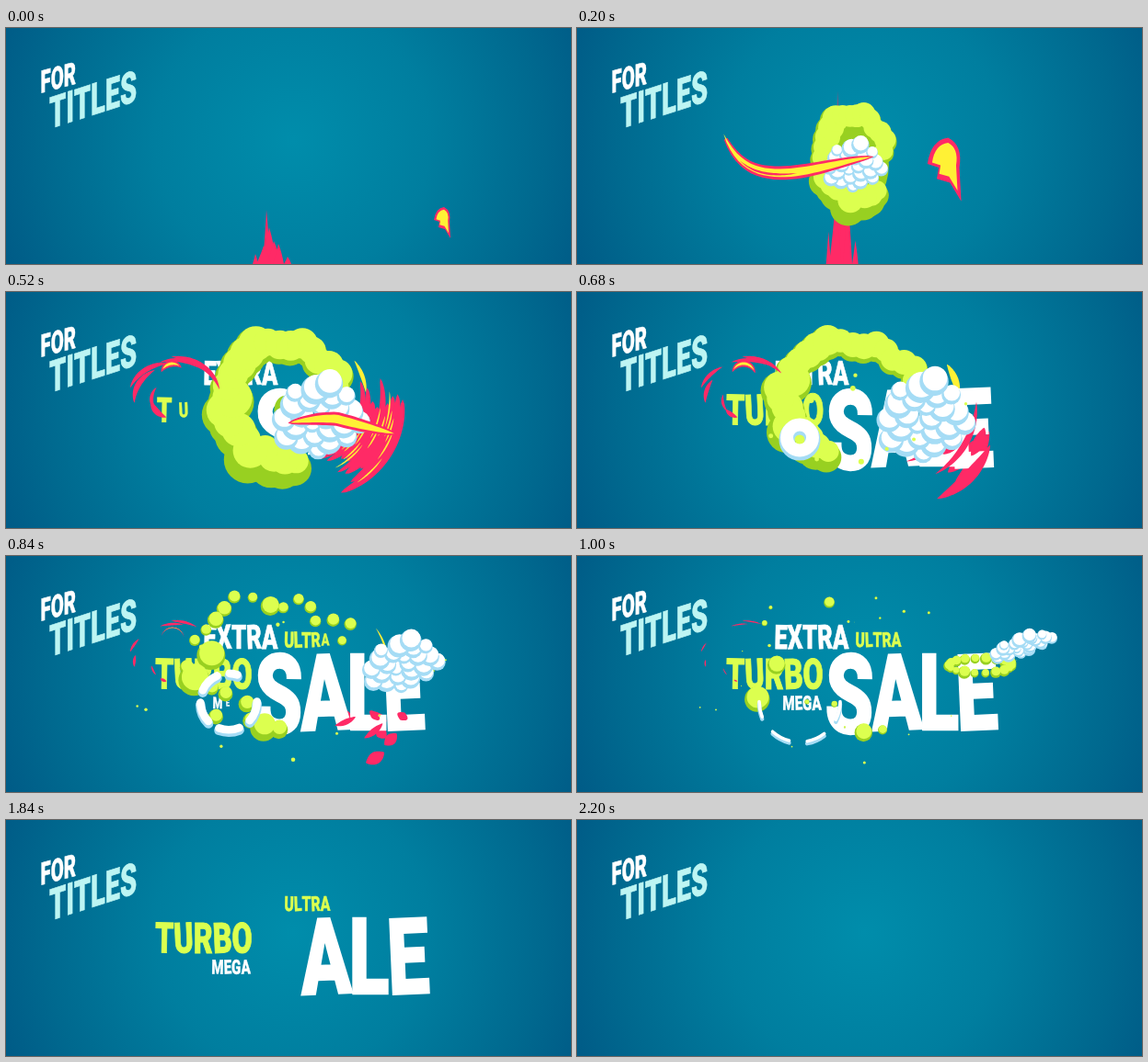
An HTML page with a canvas for the animation above (2.52 s loop, 614 px wide and 257 px high).

```html
<!DOCTYPE html>
<html lang="en">
<head>
<meta charset="utf-8">
<title>Extra Sale</title>
<style>
  html, body { margin: 0; width: 614px; height: 257px; overflow: hidden; }
  body {
    position: relative;
    background: radial-gradient(circle at 312px 122px, #008dab 0, #007e9f 150px, #00698f 270px, #005a86 345px);
  }
  canvas, svg { position: absolute; left: 0; top: 0; display: block; }
  text { font-family: Roboto, "Liberation Sans", sans-serif; font-weight: 900; }
</style>
</head>
<body>
<canvas id="back" width="614" height="257"></canvas>
<svg id="type" width="614" height="257" viewBox="0 0 614 257">
  <text transform="matrix(.6 -.16 0 1 37.5 71)" font-size="34" fill="#fff" stroke="#fff" stroke-width=".6">FOR</text>
  <text transform="matrix(.605 -.195 0 1 47 110)" font-size="48" fill="#bdf5f3" stroke="#bdf5f3" stroke-width=".7">TITLES</text>
</svg>
<canvas id="front" width="614" height="257"></canvas>
<script>
const LOOP = 2520, STEP = 40, NARROW = 0.7;
const LIME = '#dcff4f', GREEN = '#98d021', WHITE = '#fff', SKY = '#a5dcf5', PINK = '#ff2a66', YELLOW = '#fff135';
const back = document.getElementById('back').getContext('2d');
const front = document.getElementById('front').getContext('2d');
const svg = document.getElementById('type');

const ramp = (t, a, b) => Math.min(1, Math.max(0, (t - a) / (b - a)));
const mix = (a, b, k) => a + (b - a) * k;
const smooth = k => k * k * (3 - 2 * k);
const out = k => 1 - (1 - k) ** 3;
const bounce = k => 1 + 2.7 * (k - 1) ** 3 + 1.7 * (k - 1) ** 2;
const noise = n => { const v = Math.sin(n * 127.1 + 11.7) * 43758.5453; return v - Math.floor(v); };
const rad = deg => deg * Math.PI / 180;
const repeat = (n, fn) => { for (let i = 0; i < n; i++) fn(i); };

/* ---------- lettering ---------- */
const words = [
  { text: 'EXTRA', x: 214.5, y: 101, size: 36.5, fill: WHITE, from: 240, lag: 20, to: 1720, gap: 20 },
  { text: 'ULTRA', x: 302.5, y: 99, size: 22.5, fill: LIME, from: 720, lag: 20, to: 2200, gap: 0 },
  { text: 'TURBO', x: 162, y: 144.5, size: 46, fill: LIME, from: 480, lag: 20, to: 1880, gap: 40 },
  { text: 'MEGA', x: 223.5, y: 167.5, size: 21.5, fill: WHITE, from: 800, lag: 20, to: 1980, gap: 20 },
  { text: 'SALE', x: 271, y: 189, size: 115, fill: WHITE, from: 460, lag: 30, to: 1800, gap: 60, track: -1.7 }
];

const letters = [];
for (const w of words) {
  back.font = `900 ${w.size}px Roboto, "Liberation Sans", sans-serif`;
  let x = w.x;
  [...w.text].forEach((ch, i) => {
    const el = document.createElementNS('http://www.w3.org/2000/svg', 'text');
    const adv = back.measureText(ch).width * NARROW;
    const big = ch === 'S' ? 1.05 : 1;
    el.textContent = ch;
    const attrs = { 'text-anchor': 'middle', 'font-size': w.size * big, y: w.size * 0.355 * big,
      fill: w.fill, stroke: w.fill, 'stroke-width': w.size * 0.02 };
    for (const name in attrs) el.setAttribute(name, attrs[name]);
    svg.append(el);
    letters.push({
      el, x: x + adv / 2, y: w.y - w.size * 0.355 + (big - 1) * 40,
      tilt: i % 2 ? -2.5 : 1 - i / 2, slide: w.track ? -i * i : 0,
      from: w.from + i * w.lag, to: w.to + i * w.gap
    });
    x += adv + (w.track || 0);
  });
}

function setType(t) {
  for (const l of letters) {
    const on = t > l.from && t < l.to;
    l.el.style.display = on ? '' : 'none';
    if (!on) continue;
    const s = bounce(ramp(t, l.from, l.from + 160));
    const dx = l.slide * Math.exp(-Math.max(0, t - 680) / 300);
    l.el.setAttribute('transform',
      `translate(${l.x + dx} ${l.y}) rotate(${l.tilt}) scale(${NARROW * s} ${s})`);
  }
}

/* ---------- smoke ---------- */
const TIMES = [130, 360, 680, 1000];

function pose(keys, t) {
  const n = t < TIMES[1] ? 0 : t < TIMES[2] ? 1 : 2;
  const k = ramp(t, TIMES[n], TIMES[n + 1]);
  return keys[n].map((v, j) => mix(v, keys[n + 1][j], n ? smooth(k) : out(k)));
}

function disc(c, color, x, y, rx, ry = rx) {
  if (rx < 0.3) return;
  c.fillStyle = color;
  c.beginPath();
  c.ellipse(x, y, rx, ry, 0, 0, 7);
  c.fill();
}

const shadeOf = (c, b, color) => disc(c, color, b.x, b.y, b.r);
const lightOf = (c, b, color, lift) => disc(c, color, b.x + b.r * lift * 0.3, b.y - b.r * lift, b.r * (1 - lift * 0.7));
const fade = (t, i) => 1 - ramp(t, 1000, 1120 + 560 * noise(i + 5) ** 4);

// centre x, centre y, radii, puff size, first and last angle
const ringKeys = [
  [295, 175, 3, 5, 0, 50, 350],
  [306, 128, 48, 70, 20, 50, 350],
  [300, 120, 74, 62, 15, 112, 338],
  [296, 112, 92, 72, 7, 70, 335]
];

function greenRing(c, t) {
  const [cx, cy, rx, ry, size, a0, a1] = pose(ringKeys, t), N = 24, loose = ramp(t, 680, 1000);
  const balls = [];
  repeat(N, i => {
    const a = rad(mix(a0, a1, i / (N - 1)));
    const d = 1 + (noise(i) - 0.5) * mix(0.22, 0.7, loose);
    const grow = mix(1.3 - 0.3 * i / N, 2.4 * noise(i + 50) ** 3, loose);
    balls.push({
      x: cx + Math.cos(a) * rx * d, y: cy + Math.sin(a) * ry * d,
      r: size * (0.8 + 0.4 * noise(i + 20)) * grow * fade(t, i), low: Math.max(0, Math.sin(a))
    });
  });
  const body = out(ramp(t, 130, 340)) * (1 - ramp(t, 380, 560));
  disc(c, GREEN, cx, cy + 5, 52 * body, 72 * body);
  balls.forEach(b => shadeOf(c, b, GREEN));
  balls.forEach(b => lightOf(c, b, LIME, 0.18 + 0.25 * b.low * (1 - loose)));
}

// centre x, centre y, spreads, puff size, slope
const steamKeys = [
  [295, 178, 3, 3, 0, 0],
  [304, 137, 46, 35, 14, 0],
  [378, 138, 46, 42, 15, 0],
  [484, 98, 34, 9, 7.5, -0.3]
];
const grains = Array.from({ length: 24 }, (_, i) => {
  const d = Math.sqrt((i + 0.5) / 24);
  return { x: Math.cos(i * 2.4) * d, y: Math.sin(i * 2.4) * d, i };
}).sort((a, b) => b.y - a.y);

function steam(c, t) {
  const [cx, cy, sx, sy, size, slope] = pose(steamKeys, t);
  for (const g of grains) {
    const b = { x: cx + g.x * sx, y: cy + g.y * sy + g.x * sx * slope,
      r: size * (0.6 + 0.5 * noise(g.i + 80)) * fade(t, g.i) };
    shadeOf(c, b, SKY);
    lightOf(c, b, WHITE, 0.22);
  }
}

function trail(c, t) {
  const grow = smooth(ramp(t, 780, 960)) * (1 - ramp(t, 1020, 1240)), balls = [];
  repeat(18, i => {
    const a = i * 0.35;
    balls.push({ x: 438 + Math.cos(a) * 34, y: 120 + Math.sin(a) * 8, r: grow * (4 + 4 * noise(i + 60)) });
  });
  balls.forEach(b => shadeOf(c, b, GREEN));
  balls.forEach(b => lightOf(c, b, LIME, 0.25));
}

// a puffed white ring that opens out and breaks into dashes
function puffRing(c, t) {
  const width = 17 * out(ramp(t, 540, 660)) * (1 - ramp(t, 700, 1160)) ** 1.3;
  if (width < 0.3) return;
  const r = 14 * out(ramp(t, 540, 660)) + 30 * smooth(ramp(t, 700, 960));
  c.save();
  c.lineCap = 'round';
  if (t > 800) c.setLineDash([r * mix(0.8, 0.3, ramp(t, 800, 1100)), r * 0.45]);
  for (const [color, dy, w] of [[SKY, 2, 1], [WHITE, -0.5, 0.82]]) {
    c.strokeStyle = color;
    c.lineWidth = width * w;
    c.beginPath();
    c.arc(242, 159 + dy, r, 0, mix(2, 1, ramp(t, 760, 960)) * Math.PI);
    c.stroke();
  }
  c.restore();
}

/* ---------- liquid strokes ---------- */
function swoosh(c, color, w, at, a = 0, b = 1, sharp = 0.8) {
  if (b - a < 0.02 || w < 0.2) return;
  const left = [], right = [], N = 28;
  repeat(N + 1, i => {
    const u = mix(a, b, i / N), [x, y] = at(u), p = at(u - 0.01), q = at(u + 0.01);
    const dx = q[0] - p[0], dy = q[1] - p[1], len = Math.hypot(dx, dy) || 1;
    const h = w / 2 * Math.max(0, Math.sin(Math.PI * i / N)) ** sharp;
    left.push([x - dy / len * h, y + dx / len * h]);
    right.unshift([x + dy / len * h, y - dx / len * h]);
  });
  c.fillStyle = color;
  c.beginPath();
  left.concat(right).forEach(p => c.lineTo(...p));
  c.fill();
}

const arc = (x, y, rx, ry, a0, a1) => u => {
  const a = rad(mix(a0, a1, u));
  return [x + Math.cos(a) * rx, y + Math.sin(a) * ry];
};

// wave running from the upper left to the right
const wave = u => [158 + 267 * u ** 1.15, 111 + 47 * out(ramp(u, 0, 0.32)) - 20 * smooth(ramp(u, 0.28, 0.75)) + 17 * ramp(u, 0.78, 1)];

function ribbon(c, t) {
  const a = ramp(t, 400, 600), b = out(ramp(t, 140, 340));
  swoosh(c, PINK, 15, wave, a, b, 0.6);
  swoosh(c, YELLOW, 9, wave, a + 0.01, b - 0.01, 0.7);
  swoosh(c, PINK, 2.5, u => [wave(u)[0], wave(u)[1] + 1.5], a + 0.1, b - 0.3);
}

// a broad sheet that tears into separate flames
function flames(t) {
  const tear = smooth(ramp(t, 400, 640)), grow = out(ramp(t, 210, 350)), die = ramp(t, 640, 900);
  if (!grow || die === 1) return;
  const cx = mix(296, 343, tear), cy = mix(112, 120, tear);
  const strand = (i, seed) => {
    const r = mix(66 + i * 4.6, 60 + i * 6.2, tear);
    const a0 = mix(-19 + 5 * noise(seed), -28 + 55 * noise(seed), tear);
    const a1 = mix(64 + 5 * noise(seed + 9), 30 + 48 * noise(seed + 9), tear);
    return arc(cx, cy, r, r, a0, Math.max(a1, a0 + 12));
  };
  repeat(10, i => {
    const c = t > 520 && i % 2 === 0 ? back : front;
    swoosh(c, PINK, mix(9, 3 + 13 * noise(i + 4), tear), strand(i, i + 4), die, grow, mix(0.2, 0.8, tear));
  });
  repeat(14, i => {
    const s = 0.6 * noise(i + 90);
    swoosh(front, YELLOW, 3.4 * (1 - tear), strand(1 + i * 0.6, i), s, Math.min(grow, s + 0.3), 0.7);
  });
  swoosh(back, YELLOW, 9 * tear * (1 - die), arc(cx, cy, 72, 72, -35, -5));
}

// thin circles on the left, cut into dashes as they open
function circles(c, t) {
  const open = ramp(t, 480, 1160), on = out(ramp(t, 460, 600));
  if (!on || open === 1) return;
  repeat(6, i => {
    const r = i < 2 ? 24 : 34 + i * 4, a0 = 95 + 34 * i + 20 * noise(i);
    const len = mix(95, 8, out(open)) + 14 * noise(i + 3);
    const at = arc(178 + noise(i) * 6, 117, r, r * 0.86, a0, a0 + len);
    swoosh(c, PINK, (3 + 4 * noise(i + 8)) * (1 - open), at, 0, on);
  });
  const tip = arc(181, 92, 13, 14, 200, 345), left = 1 - ramp(t, 720, 860);
  swoosh(c, PINK, 7 * left, tip, 0, on);
  swoosh(c, YELLOW, 3 * left, tip, 0.1, on - 0.1);
}

function specks(c, t) {
  repeat(16, i => {
    const hot = i < 6, born = hot ? 220 : 600, life = hot ? 320 : 400 + 700 * noise(i + 31);
    const k = ramp(t, born, born + life), a = 6.28 * noise(i + 12);
    const d = out(Math.min(1, k * 2)) * (0.75 + 0.5 * noise(i + 17));
    const size = k && (1 - k) * (1.5 + 2.5 * noise(i + 23));
    disc(c, hot ? PINK : LIME, 305 + Math.cos(a) * 145 * d, 140 + Math.sin(a) * (hot ? 105 : 75) * d, size);
  });
}

function spire(c, t) {
  const wide = (1 - ramp(t, 130, 270)) * (1 + t / 300), tall = Math.min(3.2, 1 + t / 55);
  // x, height, half width
  for (const [x, h, w] of [[283, 59, 4], [286, 40, 8], [291, 25, 8], [296, 22, 6], [271, 11, 3], [280, 20, 8], [306, 8, 4]]) {
    const mid = 284 + (x - 284) * wide, y = 257 - h * tall;
    c.fillStyle = PINK;
    c.beginPath();
    c.moveTo(mid - w * wide, 257);
    c.quadraticCurveTo(mid - w * wide * 0.3, mix(257, y, 0.6), mid, y);
    c.quadraticCurveTo(mid + w * wide * 0.6, mix(257, y, 0.6), mid + w * wide, 257);
    c.fill();
  }
}

function fireball(c, t) {
  if (t >= 280) return;
  const e = smooth(t / 280), s = 1 + 1.3 * e;
  c.save();
  c.translate(475 - 92 * e, 206 - 80 * e);
  c.scale(s, s);
  for (const [color, k] of [[PINK, 1], [YELLOW, 0.75]]) {
    c.fillStyle = color;
    c.beginPath();
    c.moveTo(-10 * k, 3 * k);
    c.quadraticCurveTo(-8 * k, -10 * k, 1, -11 * k);
    c.quadraticCurveTo(9 * k, -7 * k, 7 * k, 5 * k);
    c.lineTo(8 * k, 23 * k);
    c.lineTo(2 * k, 13 * k);
    c.lineTo(-5 * k, 11 * k);
    c.lineTo(-4 * k, 5 * k);
    c.fill();
  }
  c.restore();
}

function draw(t) {
  back.clearRect(0, 0, 614, 257);
  front.clearRect(0, 0, 614, 257);
  setType(t);
  spire(back, t);
  greenRing(t < 520 ? back : front, t);
  trail(front, t);
  flames(t);
  steam(front, t);
  ribbon(front, t);
  circles(front, t);
  puffRing(front, t);
  specks(front, t);
  fireball(front, t);
}

let start = null, last = -1;
function tick(now) {
  if (start === null) start = now;
  const t = Math.floor(((now - start) % LOOP) / STEP) * STEP;
  if (t !== last) draw(last = t);
  requestAnimationFrame(tick);
}
draw(0);
requestAnimationFrame(tick);
</script>
</body>
</html>
```
